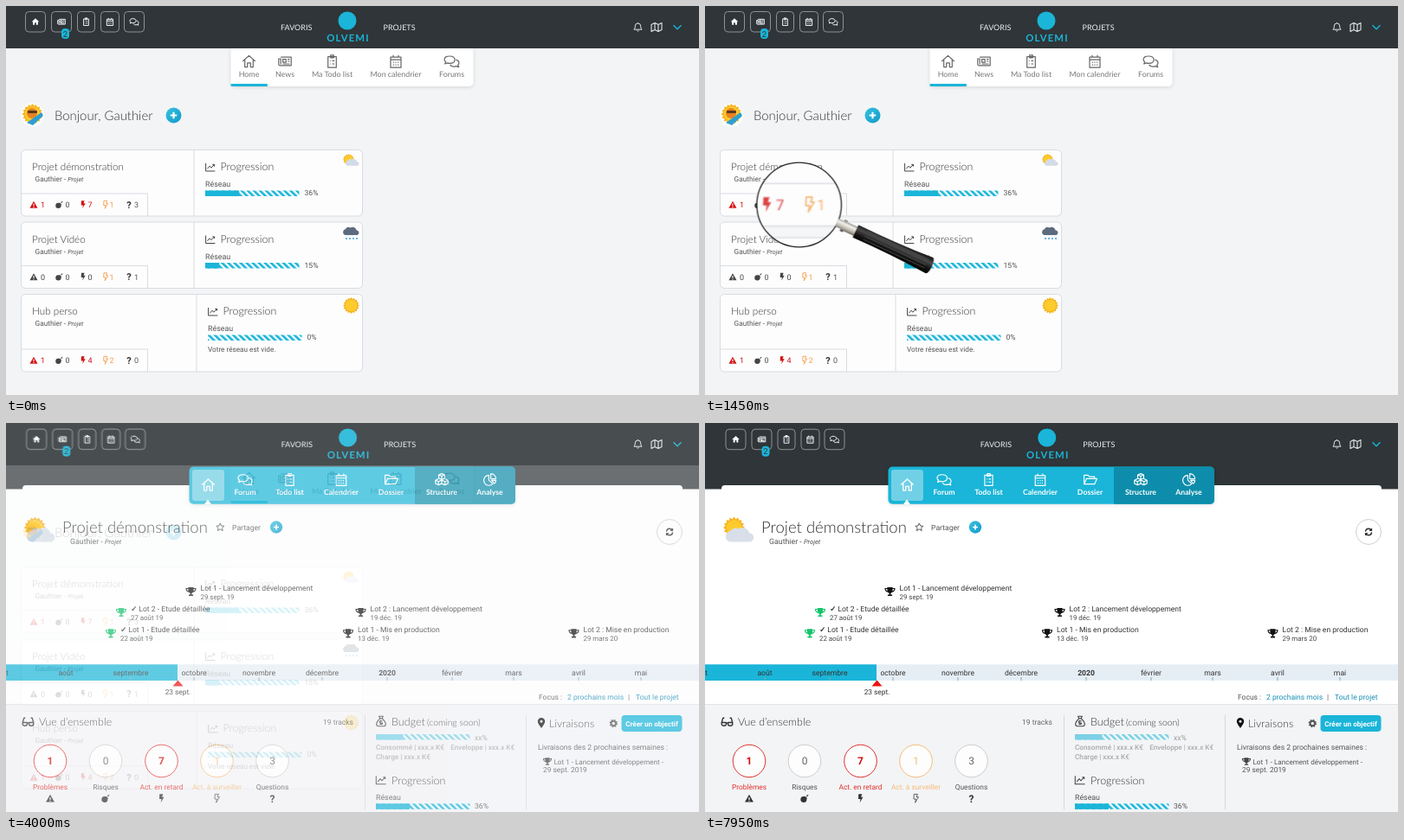
An HTML page for the animation above (8 s loop, 800 px wide and 450 px high).

```html
<!DOCTYPE html>
<html lang="fr">
<head>
<meta charset="utf-8">
<title>Tableau de bord</title>
<style>
html, body { margin: 0; width: 100%; height: 100%; overflow: hidden; background: #fff; }
svg { display: block; width: 100%; height: 100%; }
text { font-family: Roboto, Arial, sans-serif; white-space: pre; text-rendering: geometricPrecision; }
.l { font-family: Lato, Inter, sans-serif; }
.t { font-family: Lato, Inter, sans-serif; font-weight: 300; }
.b { font-weight: 700; }
.m { font-weight: 500; }
.i { font-style: italic; }
.shadow { filter: drop-shadow(0 1px 2px rgba(0, 0, 0, .12)); }
</style>
</head>
<body>
<svg id="stage" viewBox="0 0 800 450" xmlns="http://www.w3.org/2000/svg"></svg>
<script>
const CYAN = '#1ab5d8', DARK = '#2f3538', GREY = '#555', INK = '#333', RED = '#d40f0f', ORANGE = '#f5a04a';
const USER = 'Gauthier', BRAND = 'OLVEMI';

// Icons around 0,0 in a box of about 12 units; a leading "-" marks line art
const ICONS = {
  home: 'M-6 0L0-5.5 6 0H4V5H1.2V1.5H-1.2V5H-4V0Z',
  house: '-M-6 0L0-5.5 6 0M-4-1.5V5.5H-1.5V1.5H1.5V5.5H4V-1.5',
  news: '-M-4-4H6V4H-5Q-6 4-6 3V-2.5H-4V3M-2-2H1V1H-2ZM2.5-2H4.5M2.5 0H4.5M-2 2.5H4.5',
  clip: '-M-4-4.5H4V6H-4ZM-1.5-6H1.5V-3.5H-1.5ZM-2.2-.5H-1.5M0-.5H2.2M-2.2 2.5H-1.5M0 2.5H2.2',
  cal: '-M-5-4H5V6H-5ZM-5-1.5H5M-2.5-6V-4M2.5-6V-4M-2.7 1H-1.7M-.5 1H.5M1.7 1H2.7M-2.7 3.5H-1.7M-.5 3.5H.5M1.7 3.5H2.7',
  chat: '-M-2-5C1-5 3-3.5 3-1.5S1 2-2 2Q-3 2-4 1.6L-6.5 2.5-5.7 .5Q-7-.5-7-1.5C-7-3.5-5-5-2-5ZM4-1.5C6-1 7 .3 7 1.6Q7 2.7 6 3.6L6.8 5.5 4.3 4.7C2 5.5-.5 5-1.5 3.2',
  warn: 'M0-5L5.5 4.8H-5.5ZM-.7-1.5H.7V1.8H-.7ZM-.7 2.6H.7V3.9H-.7Z',
  bomb: 'M-1-2.6A3.9 3.9 0 1 0 2.6 1L3.2-.2 1-2.6ZM2-3L3-2 5-4.3 4.3-5Z',
  bolt: 'M-2.5-5.5H2L.7-1.8H3.3L-1 5.5 0 .8H-2.8Z',
  spark: '-M-2.5-5.5H2L.7-1.8H3.3L-1 5.5 0 .8H-2.8Z',
  chart: '-M-6-5V5H6M-4 2L-1-1.5 1 .8 5-3.5M2.5-3.5H5V-1',
  cup: 'M-3-5H3V-4H6Q6 0 2.5 .8L.8 2V3.5H2.5V5H-2.5V3.5H-.8V2L-2.5 .8Q-6 0-6-4H-3ZM-4.8-2.9Q-4.5-1-3-.6V-2.9ZM4.8-2.9H3V-.6Q4.5-1 4.8-2.9Z',
  star: '-M0-5L1.5-1.7 5-1.4 2.4 1 3.2 4.5 0 2.6-3.2 4.5-2.4 1-5-1.4-1.5-1.7Z',
  bell: '-M-5 3Q-3.5 1.5-3.5-1.5A3.5 3.5 0 0 1 3.5-1.5Q3.5 1.5 5 3ZM0-5V-6M-1.2 4.5Q0 6 1.2 4.5',
  map: '-M-6-3L-2-5 2-3 6-5V3L2 5-2 3-6 5ZM-2-5V3M2-3V5',
  chev: '-M-5-2.5L0 2.5 5-2.5',
  folder: '-M-6 4.5V-4.5H-2L-.5-3H4.5V-1M-6 4.5L-3.5-1H7L4.5 4.5Z',
  cubes: '-M0-6L3-4.7V-1.3L0 0-3-1.3V-4.7ZM-3-4.7L0-3.4 3-4.7M0-3.4V0M-3.3-.8L-6.3 .6V4L-3.3 5.4 0 4V.4M-6.3 .6L-3.3 2 0 .4 3.3 2 6.3 .6M-3.3 2V5.4M3.3-.8L6.3 .6V4L3.3 5.4 0 4M3.3 2V5.4',
  pie: '-M-1-4.5A5.2 5.2 0 1 0 3 4.2L-1 .5ZM1-6A5.2 5.2 0 0 1 6.2-.8H1ZM1.8 .8H6.2Q6 3 4.6 4Z',
  glasses: '-M-6 1L-4.5-4H-3M6 1L4.5-4H3M-6 1H-1V2.5A2.5 2 0 0 1-6 2.5ZM1 1H6V2.5A2.5 2 0 0 1 1 2.5ZM-1 1.5H1',
  bag: '-M-2.2-5.5H2.2L1.2-3H-1.2ZM-1.2-3Q-5.5 1-5 4Q-4.8 5.5-3 5.5H3Q4.8 5.5 5 4Q5.5 1 1.2-3M1.6 0Q-1.5-1-1.5 .5T1.5 2.3Q1.5 4-1.6 3',
  pin: 'M0 6Q-4.3 .5-4.3-1.8A4.3 4.3 0 0 1 4.3-1.8Q4.3 .5 0 6ZM0-3.4A1.6 1.6 0 1 0 .01-3.4Z',
  sync: '-M-4.5-.5A4.5 4.5 0 0 1 4-2.3M4.3-5V-2H1.3M4.5 .5A4.5 4.5 0 0 1-4 2.3M-4.3 5V2H-1.3'
};

const text = (x, y, s, size, fill = GREY, cls = '', anchor = 'start') =>
  `<text x="${x}" y="${y}" font-size="${size}" fill="${fill}" class="${cls}" text-anchor="${anchor}">${s}</text>`;
const mid = (x, y, s, size, fill, cls) => text(x, y, s, size, fill, cls, 'middle');
const title = (x, y, s, size) => text(x, y, s, size, INK, 't');
const box = (x, y, w, h, fill, rx = 0, extra = '') =>
  `<rect x="${x}" y="${y}" width="${w}" height="${h}" fill="${fill}" rx="${rx}" ${extra}/>`;
const disc = (x, y, r, fill, extra = '') => `<circle cx="${x}" cy="${y}" r="${r}" fill="${fill}" ${extra}/>`;
const path = (d, fill, extra = '') => `<path d="${d}" fill="${fill}" ${extra}/>`;
const line = (d, color, w = 1) => path(d, 'none', `stroke="${color}" stroke-width="${w}"`);

function icon(name, x, y, k, color, w = 1.1) {
  const d = ICONS[name], open = d[0] === '-';
  const paint = open
    ? `fill="none" stroke="${color}" stroke-width="${w}" stroke-linejoin="round"`
    : `fill="${color}" fill-rule="evenodd"`;
  return `<path transform="translate(${x} ${y}) scale(${k})" d="${open ? d.slice(1) : d}" ${paint}/>`;
}

function sun(x, y, r) {
  let pts = '';
  for (let i = 0; i < 32; i++) {
    const a = i * Math.PI / 16, q = i % 2 ? r * .8 : r;
    pts += `${(x + q * Math.cos(a)).toFixed(1)},${(y + q * Math.sin(a)).toFixed(1)} `;
  }
  return `<polygon points="${pts}" fill="#f7b21b"/>` + disc(x, y, r * .72, '#fdcb2e');
}
const cloud = (x, y, k, fill) =>
  `<path transform="translate(${x} ${y}) scale(${k})" fill="${fill}" d="M-7 4.5A3.7 3.7 0 0 1-6.5-2.6A4 4 0 0 1-1-4A4.5 4.5 0 0 1 6-1.3A3 3 0 0 1 7 4.5Z"/>`;

function plus(x, y, r) {
  const a = r * .42;
  return disc(x, y, r, 'url(#blue)') + line(`M${x - a} ${y}H${x + a}M${x} ${y - a}V${y + a}`, '#fff', r * .24);
}
const bar = (x, y, w, part) =>
  box(x, y, w, 6.5, '#fff') + box(x, y, w, 6.5, 'url(#stripes)') + box(x, y, w * part, 6.5, CYAN);

function header(dx, dy) {
  const keys = [['home', 22.5, 23], ['news', 52.5, 23], ['clip', 82.5, 20], ['cal', 109.5, 21], ['chat', 136.5, 23]];
  let s = box(0, 0, 800, 49, DARK);
  for (const [name, x, w] of keys)
    s += box(x + dx, 6.5 + dy, w, 23.5, 'none', 4, 'stroke="#8d9294"') +
      icon(name, x + dx + w / 2, 18.2 + dy, .72, '#fff', 1.3);
  const e = dx / 2;
  return s + box(64 + dx, 26 + dy, 9, 12, CYAN, 4) + mid(68.5 + dx, 35.5 + dy, '2', 9.5, DARK) +
    text(317 + e, 27.5, 'FAVORIS', 9, '#eef0f1', 'l') + text(435.5 + e, 27.5, 'PROJETS', 9, '#eef0f1', 'l') +
    disc(394 + e, 17, 10.5, CYAN) +
    `<g letter-spacing="1.2">${mid(395 + e, 41, BRAND, 11.3, CYAN, 'l b')}</g>` +
    icon('bell', 729.5, 24.5, .9, '#e4e6e7') + icon('map', 751, 24.5, 1, '#e4e6e7') + icon('chev', 775, 24.5, .9, CYAN, 1.5);
}

const owner = (x, y, size) =>
  `<text x="${x}" y="${y}" font-size="${size}" fill="${GREY}">${USER} - <tspan class="i" font-size="${size * .86}">Projet</tspan></text>`;

function card(y, h, name, counts, pct, split, note) {
  const end = y + h, row = end - 13.2, x = split + 13, late = counts[0] > 0;
  const marks = [
    ['warn', 32, 40, late ? RED : '#444'], ['bomb', 61.5, 68.5, '#444', GREY],
    ['bolt', 89, 94.5, counts[2] > 0 ? RED : '#444'], ['spark', 115, 119.5, ORANGE]
  ];
  let s = box(17.5, y, 394, h, '#fdfdfe', 5, 'stroke="#d8dce0"') +
    line(`M${split} ${y}V${end}M17.5 ${end - 26}H163.5V${end}`, '#d8dce0') +
    title(30, y + 23.5, name, 11.7) + owner(33.5, y + 36.5, 8.3);
  marks.forEach(([mark, ix, tx, color, ink], i) => {
    s += icon(mark, ix, row, .82, color) + text(tx, row + 3.3, counts[i], 9, ink || color);
  });
  s += mid(142, row + 4, '?', 11, INK, 'b') + text(148, row + 3.3, counts[4], 9);
  s += icon('chart', x + 6, y + 20, .9, '#444') + title(x + 17.5, y + 23.7, 'Progression', 12.4) +
    text(x, y + 42.5, 'Réseau', 8.9) + bar(x, y + 47, 108.5, pct / 100) + text(x + 114.5, y + 52.7, pct + '%', 8.6);
  return s + (note ? text(x, y + 66.5, note, 8.2) : '');
}

function dashboard() {
  const tabs = [['house', 280.5, 'Home'], ['news', 322, 'News'], ['clip', 376.5, 'Ma Todo list'],
    ['cal', 450, 'Mon calendrier'], ['chat', 514.5, 'Forums']];
  let s = box(0, 0, 800, 450, '#f3f4f6') + box(259.5, 44, 280, 49, '#fff', 5, 'class="shadow"') + header(0, 0);
  for (const [name, x, label] of tabs)
    s += icon(name, x, 64, 1.2, '#666', 1) + mid(x, 81.5, label, 8.9, '#777', 'l');
  s += box(259.5, 90, 42.5, 3, CYAN, 1);
  s += disc(30.5, 126, 13.5, '#fff') + sun(30.5, 125, 12) + disc(30, 124, 6, '#e98220') +
    box(25, 121, 11, 3, '#5b3a22', 1) + path('M24 135L41 123 43 127 31 138Z', '#2e9fd0');
  s += title(56, 131.5, 'Bonjour, ' + USER, 14.9) + plus(193.5, 126.5, 9);
  s += card(166.5, 76.5, 'Projet démonstration', [1, 0, 7, 1, 3], 36, 217) +
    card(250, 76.5, 'Projet Vidéo', [0, 0, 0, 1, 1], 15, 217) +
    card(333.5, 89.5, 'Hub perso', [1, 0, 4, 2, 0], 0, 220, 'Votre réseau est vide.');
  s += sun(395.5, 177.5, 6.5) + cloud(400, 181, .85, '#d3dbe6');
  s += cloud(398.5, 260.5, 1, '#5c6b7e') + line('M393 268v2M397 268v2M401 268v2M405 268v2', '#4aa3dc', 1.6);
  return s + sun(398.5, 346.5, 9.5);
}

function milestone(x, y, name, date, done) {
  const tick = done ? '<tspan class="b">✓</tspan> ' : '';
  return icon('cup', x, y, 1.02, done ? '#16c46c' : '#111') +
    text(x + 11, y - 1, tick + name, 8.6, INK) + text(x + 11, y + 8.6, date, 7.9, '#444');
}

function project() {
  const tabs = [['chat', 276, 'Forum'], ['clip', 327.5, 'Todo list'], ['cal', 387, 'Calendrier'],
    ['folder', 444.5, 'Dossier'], ['cubes', 503, 'Structure'], ['pie', 558.5, 'Analyse']];
  let s = box(0, 0, 800, 450, '#fff') + box(0, 0, 800, 76.5, DARK) + header(1.5, .7) + box(19, 72, 762, 20, '#fff', 4);
  s += `<g class="shadow">${box(211.5, 50.5, 376.5, 43.3, CYAN, 5)}</g>` +
    path('M472 50.5H583Q588 50.5 588 55.5V88.8Q588 93.8 583 93.8H472Z', '#0d8dab') +
    box(215, 54, 37, 36, '#70d0e6', 3) + path('M229 94L233 88.5 237 94Z', '#fff') + icon('house', 233.5, 71.5, 1.2, '#fff');
  for (const [name, x, label] of tabs)
    s += icon(name, x, 65.5, 1.15, '#fff', 1) + mid(x, 83, label, 8.7, '#fff', 'l b');

  s += sun(33.5, 121, 12.5) + cloud(40.5, 129.5, 1.75, '#d9dfe8') +
    title(65, 127, 'Projet démonstration', 18.5) + owner(74, 140, 8.8) +
    icon('star', 247.3, 120.5, .9, GREY) + text(261, 123.5, 'Partager', 8.6) + plus(312, 120.5, 7.2) +
    disc(766, 126, 14.5, '#fff', 'stroke="#cfcfcf"') + icon('sync', 766, 126, .8, INK, 1.8);

  s += milestone(213.5, 195, 'Lot 1 - Lancement développement', '29 sept. 19') +
    milestone(133, 219, 'Lot 2 - Etude détaillée', '27 août 19', true) +
    milestone(121, 243.3, 'Lot 1 - Etude détaillée', '22 août 19', true) +
    milestone(409.5, 219, 'Lot 2 : Lancement développement', '19 déc. 19') +
    milestone(395, 243.3, 'Lot 1 - Mis en production', '13 déc. 19') +
    milestone(655.5, 243.3, 'Lot 2 : Mise en production', '29 mars 20');

  s += box(0, 279.3, 800, 18.7, '#e6eef5') + box(0, 279.3, 198, 18.7, CYAN) + text(0, 292, 't', 8.5, INK);
  const months = [['août', 69], ['septembre', 144], ['octobre', 217], ['novembre', 292], ['décembre', 365],
    ['2020', 440], ['février', 515], ['mars', 586], ['avril', 661], ['mai', 733]];
  for (const [name, x] of months)
    s += mid(x, 292, name, 8.6, INK, name === '2020' ? 'b' : '') + line(`M${x} 294V298`, '#8aa');
  s += path('M198.5 297.5L204.5 304.5H192.5Z', '#ee1212') + mid(198.5, 314, '23 sept.', 8.3, INK) +
    text(615, 320, 'Focus :', 8.5) + text(648, 320, '2 prochains mois', 8.5, '#188eb5') +
    text(718, 320, '|', 8.5) + text(727, 320, 'Tout le projet', 8.5, '#188eb5');

  s += box(0, 325, 800, 125, '#f3f4f6') + line('M0 325.5H800', '#e0e2e5') + line('M414.5 338V447M600.5 338V447', '#d5d7da') +
    icon('glasses', 25.5, 345.5, 1.05, INK, 1.3) + title(38, 349.5, 'Vue d’ensemble', 12.4) +
    text(401, 348.5, '19 tracks', 8.5, '#666', '', 'end');
  const gauges = [[51, 1, 'Problèmes', 'warn', '#e0302c'], [115, 0, 'Risques', 'bomb'], [179.5, 7, 'Act. en retard', 'bolt', '#e0302c'],
    [243.5, 1, 'Act. à surveiller', 'spark', '#f6bb78'], [307.5, 3, 'Questions']];
  for (const [x, n, label, name, color] of gauges) {
    const hot = color === '#e0302c', ink = name === 'spark' ? '#444' : INK;
    s += disc(x, 391, 18.8, '#fdfdfd', `stroke="${color || '#cdcdcd'}" stroke-width="1"`) +
      mid(x, 395.3, n, 12, hot ? RED : color || '#666', hot ? 'b' : '') + mid(x, 424, label, 8.4, color || GREY) +
      (name ? icon(name, x, 434.3, .9, ink, .9) : mid(x, 438.5, '?', 12, INK, 'b'));
  }

  s += icon('bag', 433, 345, 1.05, '#444') + title(445, 349.5, 'Budget', 12.6) +
    title(486, 349.5, '(coming soon)', 10.4) +
    `<g opacity=".55">${bar(427, 360, 108.5, .29)}</g>` + text(541, 366.5, 'xx%', 8.5, '#999') +
    text(427, 377.5, 'Consommé | xxx.x K€', 8.2, '#aaa', 'm') + text(587, 377.5, 'Enveloppe | xxx.x K€', 8.1, '#aaa', 'm', 'end') +
    text(427, 388.5, 'Charge | xxx.x K€', 8.2, '#aaa', 'm') +
    icon('chart', 433, 413, .95, '#444') + title(445, 417.5, 'Progression', 12.5) +
    text(427, 435.5, 'Réseau', 8.8) + bar(427, 440.3, 108.5, .36) + text(541, 446.3, '36%', 8.6);

  s += icon('pin', 618, 347, .98, '#111') + title(627, 351.5, 'Livraisons', 12.3) +
    disc(701.3, 347.5, 2.7, 'none', 'stroke="#555" stroke-width="2"') +
    disc(701.3, 347.5, 4, 'none', 'stroke="#555" stroke-width="1.4" stroke-dasharray="1.6 1.54"') +
    box(710.5, 338, 70, 19, CYAN, 4) + mid(745.5, 350.5, 'Créer un objectif', 8.1, '#fff', 'b') +
    text(614, 378, 'Livraisons des 2 prochaines semaines :', 8.65) + icon('cup', 625, 391.5, .85, '#444') +
    text(632.5, 394.5, 'Lot 1 - Lancement développement -', 8.1) + text(620, 403.7, '29 sept. 2019', 8.4);
  return s;
}

const loupe = `
  <g clip-path="url(#lens)">${disc(0, 0, 49, '#fff')}<g id="zoom"><use href="#home"/></g>${disc(0, 0, 49, '#fff', 'opacity=".22"')}</g>
  ${disc(0, 0, 48.8, 'none', 'stroke="#222" stroke-width="1.3"')}
  <g transform="rotate(25)">
    ${path('M48-5H55V-7H59V-5.5H73V6H59V7.5H55V5H48Z', 'url(#steel)')}
    ${path('M72-8Q120-7 166-10Q169-9 169 0T166 10Q120 7 72 8Z', 'url(#grip)')}
    ${line('M84-5.5H162M84 1H162M84 5H162', '#555', .7)}
  </g>`;

const shade = (id, stops, dir) => `<linearGradient id="${id}" x1="0" y1="0" ${dir}>` +
  stops.map((c, i) => `<stop offset="${i / (stops.length - 1)}" stop-color="${c}"/>`).join('') + '</linearGradient>';

const byId = id => document.getElementById(id);
byId('stage').innerHTML = `<defs>
  ${shade('blue', ['#35c3e0', '#1399c8'], 'x2="1" y2="1"')}
  ${shade('steel', ['#777', '#f4f1ec', '#b9b2aa', '#4a4643'], 'x2="0" y2="1"')}
  ${shade('grip', ['#111', '#4a4a4a', '#141414', '#000'], 'x2="0" y2="1"')}
  <pattern id="stripes" width="5" height="5" patternUnits="userSpaceOnUse" patternTransform="rotate(-45)">${box(0, 0, 2.7, 5, CYAN)}</pattern>
  <clipPath id="lens">${disc(0, 0, 49, '#000')}</clipPath>
</defs>
<g id="next">${project()}</g>
<g id="first"><g id="home">${dashboard()}</g></g>
${box(.8, 325.6, 414.6, 122.4, 'none', 0, 'id="frame" stroke="#1414a8" stroke-width="1.6"')}
<g id="loupe">${loupe}</g>`;

const LOOP = 8000, ZOOM = 1.9, LENS_Y = 230;
function play(id, prop, steps) {
  const keys = steps.map(([t, v]) => ({ offset: t / LOOP, [prop]: v }));
  byId(id).animate(keys, { duration: LOOP, iterations: Infinity });
}
// Lens centre over time: a steady sweep along the first card's counters
const sweep = [[0, 31.5], [795, 31.5], [1850, 155.5], [LOOP, 155.5]];
play('loupe', 'transform', sweep.map(([t, x]) => [t, `translate(${x}px, ${LENS_Y}px)`]));
play('zoom', 'transform', sweep.map(([t, x]) => [t, `translate(${-ZOOM * x}px, ${-ZOOM * LENS_Y}px) scale(${ZOOM})`]));
play('loupe', 'opacity', [[0, 0], [30, 0], [450, 1], [2000, 1], [2500, 0], [LOOP, 0]]);
play('first', 'opacity', [[0, 1], [3700, 1], [4000, .18], [4300, 0], [LOOP, 0]]);
play('next', 'opacity', [[0, 0], [3700, 0], [4000, .85], [4300, 1], [LOOP, 1]]);
play('frame', 'opacity', [[0, 0], [4720, 0], [5200, 1], [5720, 1], [7900, 0], [LOOP, 0]]);
</script>
</body>
</html>
```
